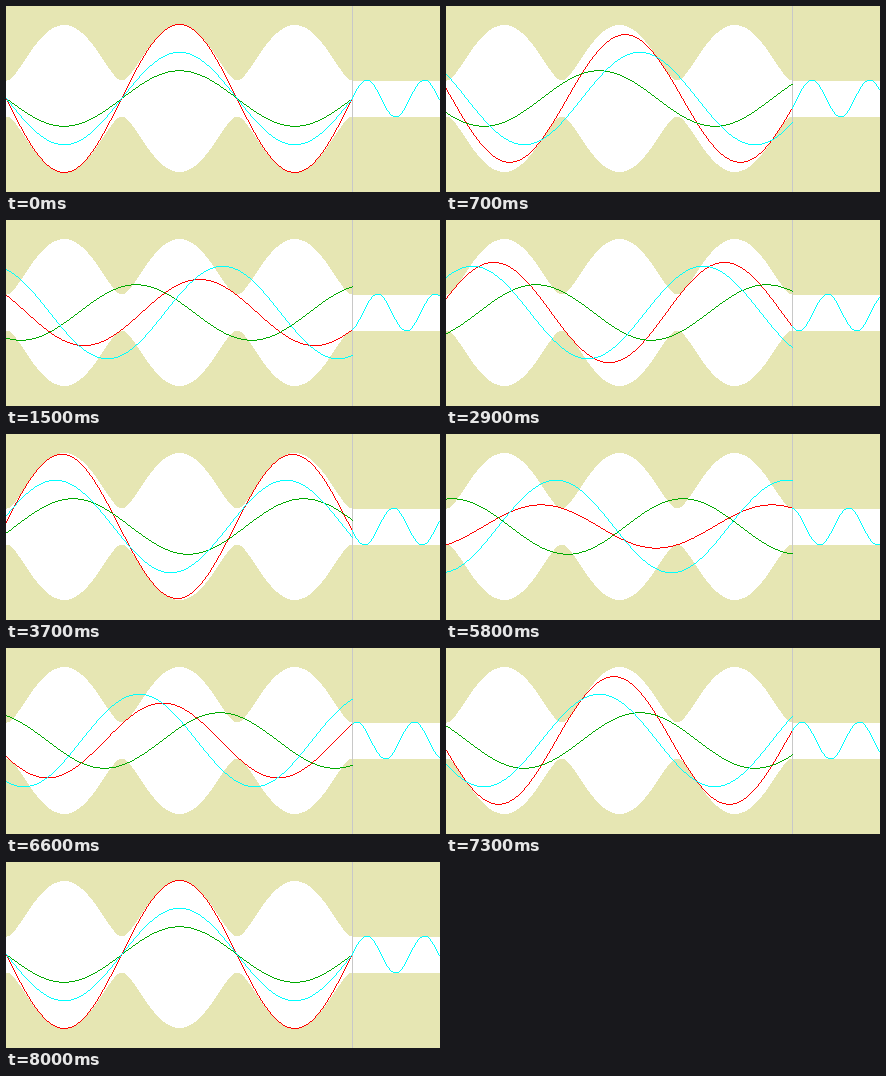
Animation, 434 px wide and 186 px high, one loop 8.1 s. Source, as a matplotlib script:

```python
import numpy as np
import matplotlib.pyplot as plt
from matplotlib.animation import FuncAnimation

WIDTH, HEIGHT, DPI = 434, 186, 100
BOUNDARY, MID = 346, 92
FRAMES, PERIOD = 81, 80          # the last frame repeats the first

INCIDENT = 46.25
INDEX = 4                        # refractive index right of the boundary
REFLECTED = INCIDENT * (INDEX - 1) / (INDEX + 1)
TRANSMITTED = INCIDENT - REFLECTED
K = 2 * np.pi * 1.5 / BOUNDARY

BEIGE, WHITE, GREY = (230, 230, 179), (255, 255, 255), (200, 200, 200)
RED, GREEN, CYAN = (255, 0, 0), (0, 170, 0), (0, 255, 255)

left = np.arange(0, BOUNDARY + 1)
right = np.arange(BOUNDARY, WIDTH)


def to_row(offset):
    return np.floor(MID + offset + 0.5 + 1e-9).astype(int)


def draw_background():
    canvas = np.full((HEIGHT, WIDTH, 3), BEIGE, dtype=np.uint8)
    envelope = np.full(WIDTH, TRANSMITTED)
    envelope[left] = np.sqrt(INCIDENT**2 + REFLECTED**2
                             - 2 * INCIDENT * REFLECTED * np.cos(2 * K * left))
    rows = np.arange(HEIGHT)[:, None]
    canvas[(rows > to_row(-envelope)) & (rows < to_row(envelope))] = WHITE
    canvas[:, BOUNDARY] = GREY
    return canvas


def draw_curve(canvas, x, offset, color):
    """Join neighbouring columns with one-pixel, unsmoothed segments."""
    y = to_row(offset)
    dy = np.diff(y)
    steps = np.maximum(np.abs(dy), 1)
    for k in range(steps.max() + 1):
        part = np.minimum(k / steps, 1)
        rows = y[:-1] + np.rint(part * dy).astype(int)
        columns = x[:-1] + np.rint(part).astype(int)
        canvas[rows, columns] = color


background = draw_background()
fig = plt.figure(figsize=(WIDTH / DPI, HEIGHT / DPI), dpi=DPI)
ax = fig.add_axes([0, 0, 1, 1])
ax.axis("off")
image = ax.imshow(background, interpolation="nearest", aspect="auto")


def update(frame):
    phase = 2 * np.pi * frame / PERIOD
    incident = INCIDENT * np.sin(K * left - phase)
    reflected = REFLECTED * np.sin(K * left + phase)
    transmitted = -TRANSMITTED * np.sin(INDEX * K * (right - BOUNDARY) - phase)

    canvas = background.copy()
    draw_curve(canvas, left, incident + reflected, RED)
    draw_curve(canvas, left, reflected, GREEN)
    draw_curve(canvas, left, incident, CYAN)
    draw_curve(canvas, right, transmitted, CYAN)
    image.set_data(canvas)
    return [image]


anim = FuncAnimation(fig, update, frames=FRAMES, interval=100, repeat=True,
                     repeat_delay=0, blit=False)
plt.show()
```
